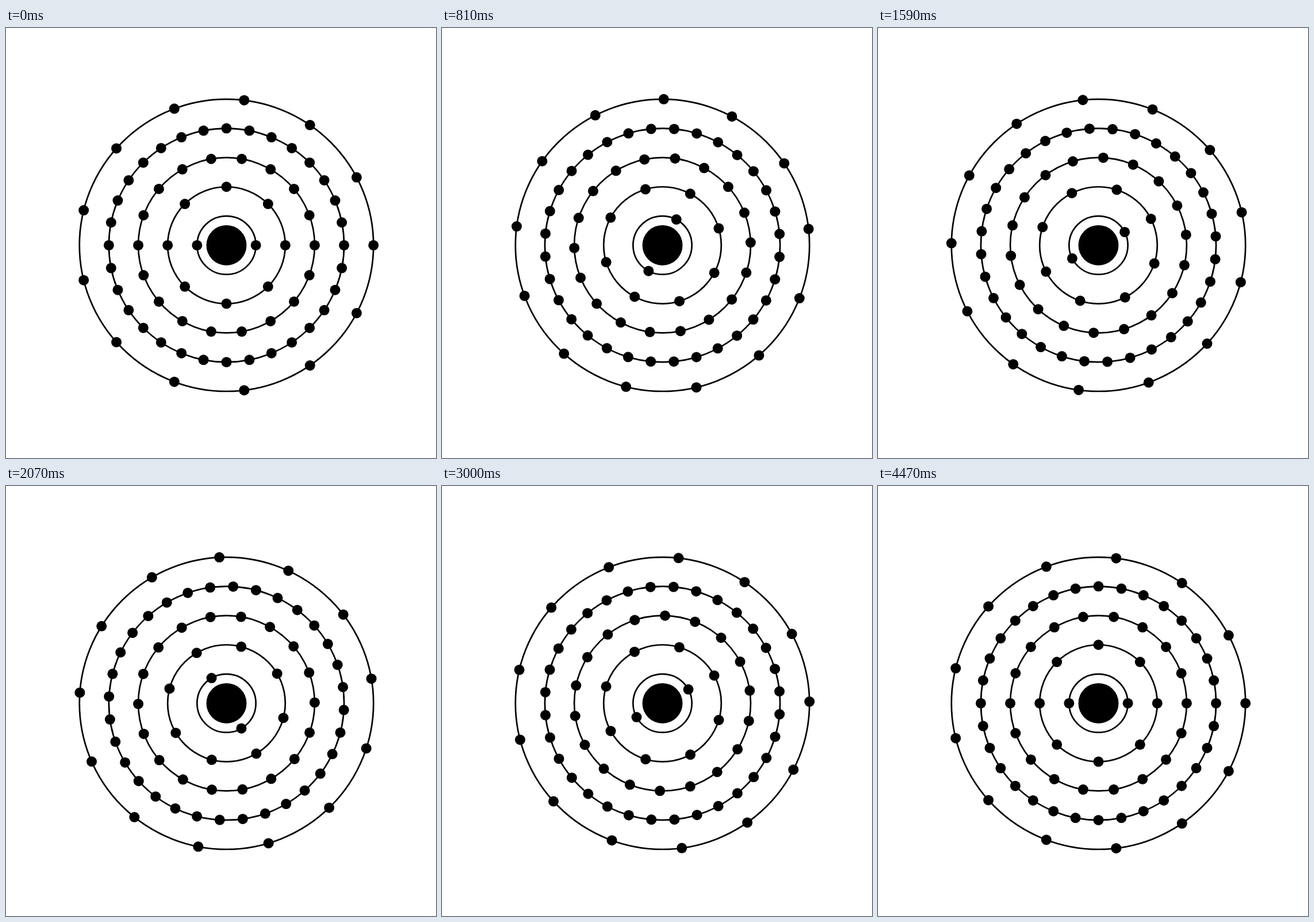
Animation of 748 by 748 pixels, one loop 4.5 s. Source, as an HTML page with a canvas:

```html
<!DOCTYPE html>
<html lang="en">
<head>
<meta charset="utf-8">
<title>Electron shells</title>
<style>
  html, body { margin: 0; width: 100%; height: 100%; overflow: hidden; background: #fff; }
  canvas { display: block; }
</style>
</head>
<body>
<canvas id="stage" width="748" height="748"></canvas>
<script>
const ctx = document.getElementById('stage').getContext('2d');
const STEP = 30, STEPS = 150;
const CX = 383.5, CY = 377.9;
const GAP_X = 51.15, GAP_Y = 50.82;
const SHELLS = [2, 8, 18, 32, 13];
const SPIN = 765 * Math.PI / 180;

function disc(x, y, r) {
  ctx.beginPath();
  ctx.arc(x, y, r, 0, 2 * Math.PI);
  ctx.fill();
}

function draw(angle) {
  ctx.fillStyle = '#fff';
  ctx.fillRect(0, 0, 748, 748);
  ctx.fillStyle = ctx.strokeStyle = '#000';
  ctx.lineWidth = 2.7;
  disc(CX, CY, 35);
  SHELLS.forEach((count, i) => {
    const rx = GAP_X * (i + 1), ry = GAP_Y * (i + 1);
    ctx.beginPath();
    ctx.ellipse(CX, CY, rx, ry, 0, 0, 2 * Math.PI);
    ctx.stroke();
    for (let k = 0; k < count; k++) {
      const a = angle + 2 * Math.PI * k / count;
      disc(CX + rx * Math.cos(a), CY - ry * Math.sin(a), 9);
    }
  });
}

// The loop opens on the rest pose, then spins clockwise with a cubic ease-out.
function tick() {
  const step = Math.floor(performance.now() / STEP) % STEPS || STEPS;
  draw(SPIN * (1 - step / STEPS) ** 3);
  requestAnimationFrame(tick);
}
tick();
</script>
</body>
</html>
```
